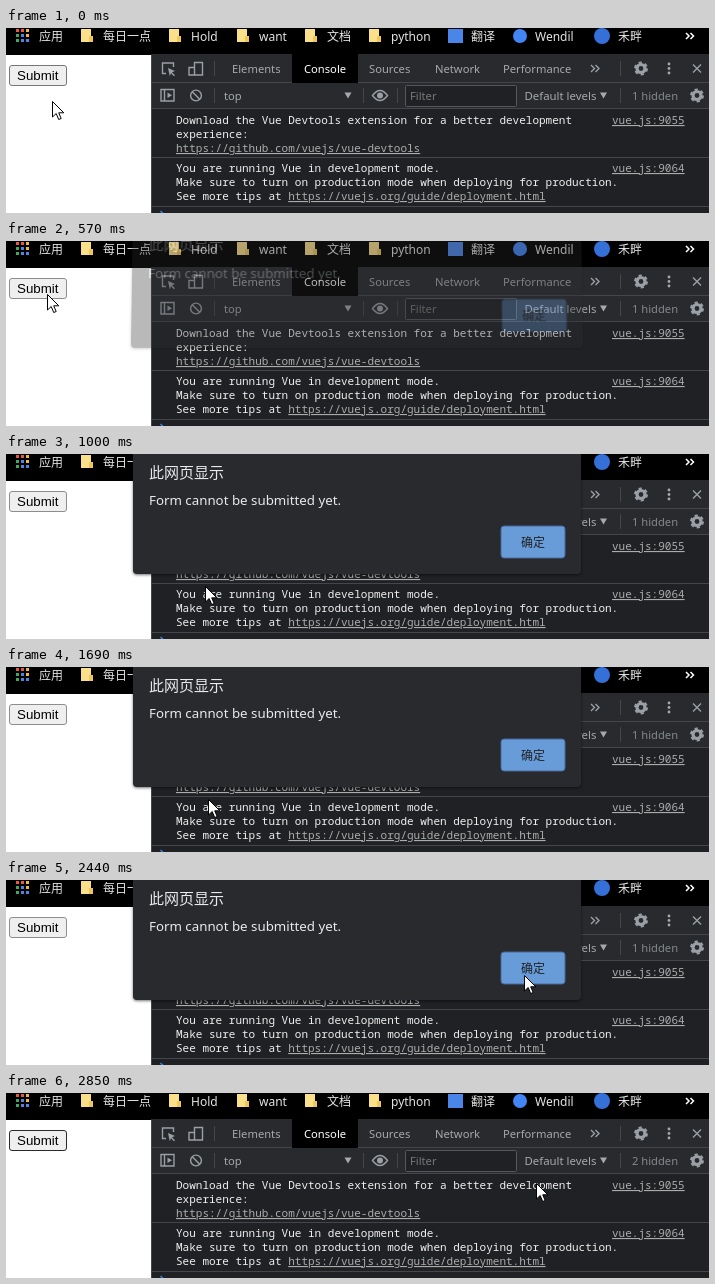
Animation of 703 by 185 pixels, one loop 3260 ms. Source, as an HTML page:

```html
<!DOCTYPE html>
<html lang="zh">
<head>
<meta charset="utf-8">
<title>Form alert</title>
<style>
html, body { margin: 0; width: 100%; height: 100%; overflow: hidden; background: #fff; }
body { position: relative; font-family: "Noto Sans", "Noto Sans CJK SC", sans-serif; }
svg { position: absolute; left: 0; top: 0; display: block; }
text { white-space: pre; }
#bookmarks { font-size: 12px; fill: #e4e4e4; }
#tools { font-size: 11.2px; fill: #a5a9ad; }
#log { font: 500 11px "Noto Sans Mono", monospace; fill: #f0f0f0; }
.link { fill: #acacac; text-decoration: underline; }
.icon { fill: none; stroke: #9aa0a6; stroke-width: 1.4; }
.line { fill: none; stroke: #43464a; }
#dialog {
  position: absolute; left: 127px; top: -10px; width: 448px; height: 130px;
  background: #292a2d; border-radius: 4px; box-shadow: 0 1px 3px rgba(0, 0, 0, .55);
  transform-origin: 50% 0; color: #e8eaed;
}
#dialog svg { overflow: visible; }
</style>
</head>
<body>
<svg width="703" height="185">
  <rect width="703" height="27"/>
  <g id="bookmarks"></g>

  <rect id="submit" x="3.5" y="37.5" width="57" height="20" rx="2.5"/>
  <text x="11" y="52" font-family="Liberation Sans, Arial, sans-serif" font-size="13.33">Submit</text>

  <rect x="145" y="26" width="558" height="159" fill="#202124"/>
  <rect x="145" y="26" width="558" height="55" fill="#292a2d"/>
  <path class="line" d="M145.5 27V185M146 54.5H703M146 80.5H703M146 129.5H703M146 178.5H703
    M208.5 33V48M208.5 60V75M357.5 60V75M391.5 60V75M614.5 33V48M614.5 60V75"/>
  <rect x="286" y="26" width="66" height="29"/>

  <g id="tools">
    <text x="226" y="45">Elements</text>
    <text x="298" y="45" fill="#fff">Console</text>
    <text x="363" y="45">Sources</text>
    <text x="429" y="45">Network</text>
    <text x="497" y="45">Performance</text>
    <text x="218" y="72">top</text>
    <rect x="399.5" y="57.5" width="111" height="21" rx="1" fill="#202124" stroke="#54575b"/>
    <text x="404" y="72" fill="#777">Filter</text>
    <text x="518.5" y="72" font-size="11.4">Default levels</text>
    <text id="hidden" x="626" y="72" fill="#83888d"></text>
    <path d="M338.5 64.5h7l-3.5 6zM594 64.5h7l-3.5 6z"/>
    <circle cx="663" cy="36" r="1.4"/><circle cx="663" cy="40.5" r="1.4"/><circle cx="663" cy="45" r="1.4"/>
  </g>
  <g class="icon">
    <path d="M160 45.5h-3.5v-10.500h11v4"/>
    <path d="M162 40l7 3-3 1.2 3 3-1 1-3-3-1.2 3z" fill="#9aa0a6" stroke="none"/>
    <path d="M188.5 39V34.500h8v12.500h-8zM183 39.5h5.500v7.500h-5.500z"/>
    <path d="M155 61.500h13v11.500h-13zM158.500 61.500v11.500"/>
    <path d="M161.500 64.500l4.500 2.700-4.500 2.700z" fill="#9aa0a6" stroke="none"/>
    <circle cx="190" cy="67.500" r="5.400"/><path d="M186.200 63.700l7.600 7.600"/>
    <path d="M366.500 67.500Q374 57.500 381.500 67.500Q374 77.500 366.500 67.500z"/>
    <circle cx="374" cy="67.500" r="2.300" fill="#9aa0a6"/>
    <path d="M585 37l3.500 3.500-3.500 3.500M589.500 37l3.500 3.500-3.500 3.500"/>
    <path d="M687 36.500l8 8M695 36.500l-8 8"/>
    <g id="gear"><circle cx="635" cy="40.500" r="4" stroke-width="3.200"/>
      <circle cx="635" cy="40.500" r="6" stroke-width="2" stroke-dasharray="3.200 3.083"/></g>
    <use href="#gear" x="56" y="27"/>
  </g>

  <g id="log">
    <text x="170" y="96">Download the Vue Devtools extension for a better development</text>
    <text x="170" y="110">experience:</text>
    <text x="170" y="124" class="link">https://github.com/vuejs/vue-devtools</text>
    <text x="606" y="96" class="link">vue.js:9055</text>
    <text x="170" y="144">You are running Vue in development mode.</text>
    <text x="170" y="158">Make sure to turn on production mode when deploying for production.</text>
    <text x="170" y="172">See more tips at <tspan class="link">https://vuejs.org/guide/deployment.html</tspan></text>
    <text x="606" y="144" class="link">vue.js:9064</text>
  </g>
  <path d="M154.500 183l4 4" stroke="#3b7de0" stroke-width="1.5"/>
</svg>

<div id="dialog">
  <svg width="448" height="130" fill="#e8eaed">
    <text x="16" y="33.5" font-size="15">此网页显示</text>
    <text x="16" y="61" font-size="13.3">Form cannot be submitted yet.</text>
    <rect id="ok" x="368" y="82" width="64" height="32" rx="3" fill="#689cd8"/>
    <text x="388" y="103" font-size="12" fill="#202124">确定</text>
  </svg>
</div>

<svg width="703" height="185">
  <path id="cursor" d="M.5 .5V16L4.200 12.500 6.700 18.500 9.200 17.500 6.700 11.800H11.800Z" fill="#fff" stroke="#000"/>
</svg>

<script>
const LOOP = 3260, TICK = 140 / 3;
const $ = id => document.getElementById(id);
const set = (id, attrs) => {
  for (const name in attrs) $(id).setAttribute(name, attrs[name]);
};

const label = (x, text) => `<text x="${x}" y="13">${text}</text>`;
const folder = (x, text) =>
  `<path d="M${x} 1h10v13h-10z" fill="#fbe08a"/><path d="M${x + 8} 8h4v6h-4z" fill="#efc65c"/>` + label(x + 22, text);
const appColors = ["#e8593f", "#e8593f", "#f0b93a", "#43a85c", "#4a86e8", "#f0b93a", "#43a85c", "#4a86e8", "#4a86e8"];

$("bookmarks").innerHTML =
  appColors.map((c, i) => `<rect x="${10 + i % 3 * 5}" y="${1 + Math.floor(i / 3) * 5}" width="3" height="3" fill="${c}"/>`).join("") +
  label(33, "应用") +
  [[75, "每日一点"], [163, "Hold"], [231, "want"], [299, "文档"], [363, "python"]].map(b => folder(...b)).join("") +
  `<rect x="442" y="1" width="15" height="14" fill="#4a86e8"/>` + label(465, "翻译") +
  `<circle cx="514" cy="8" r="7" fill="#4285f4"/>` + label(529, "Wendil") +
  `<circle cx="596" cy="8" r="8" fill="#3470d8"/>` + label(612, "禾畔") +
  `<path d="M680 5l3 3-3 3M684.5 5l3 3-3 3" fill="none" stroke="#fff" stroke-width="1.5"/>`;

// Keys are [tick, ...values]
const cursorKeys = [
  [0, 46, 73], [8, 41, 53], [15, 41, 53], [21, 199, 132], [35, 199, 132], [36, 202, 132],
  [39, 268, 128], [46, 467, 110], [47, 488, 109], [54, 530, 90]
];
// Values: opacity, vertical offset
const dialogKeys = [
  [11, 0, -14], [12, .33, -14], [13, .7, -5], [14, .93, -1.5], [15, 1, 0],
  [56, 1, 0], [57, 1, -2], [58, .75, -5], [59, .45, -9], [60, .18, -12], [61, 0, -14]
];

function at(keys, tick) {
  const next = keys.findIndex(key => key[0] > tick);
  if (next < 0) return keys[keys.length - 1].slice(1);
  if (next === 0) return keys[0].slice(1);
  const a = keys[next - 1], b = keys[next], p = (tick - a[0]) / (b[0] - a[0]);
  return a.slice(1).map((v, i) => v + (b[i + 1] - v) * p);
}

function draw(now) {
  const tick = Math.floor(now % LOOP / TICK);
  const [x, y] = at(cursorKeys, tick);
  set("cursor", { transform: `translate(${Math.round(x)} ${Math.round(y)})` });

  const [opacity, offset] = at(dialogKeys, tick);
  $("dialog").style.opacity = opacity;
  $("dialog").style.transform = offset
    ? `translateY(${offset}px) perspective(1000px) rotateX(${-offset * .3}deg)` : "none";
  set("ok", { stroke: tick < 54 ? "#46679a" : "none" });

  const closed = tick >= 57, hover = tick >= 7 && tick < 10, pressed = tick >= 10;
  set("submit", {
    fill: hover ? "#e5e5e5" : "#efefef",
    stroke: closed ? "#2a2a2a" : hover ? "#4f4f4f" : pressed ? "#8d8d8d" : "#767676"
  });
  $("hidden").textContent = (closed ? 2 : 1) + " hidden";
  requestAnimationFrame(draw);
}
requestAnimationFrame(draw);
</script>
</body>
</html>
```
